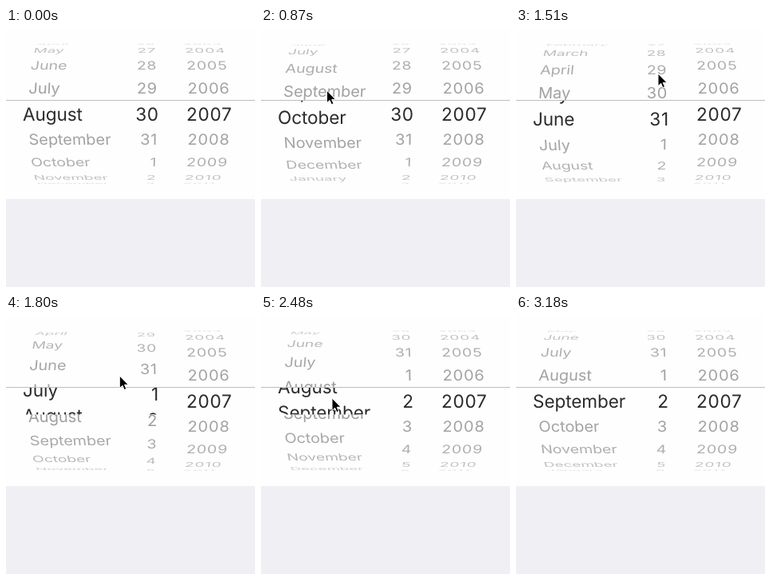
Animation of 312x324 px, one loop 4760 ms. Source, as an HTML page:

```html
<!DOCTYPE html>
<html lang="en">
<head>
<meta charset="utf-8">
<title>Date picker</title>
<style>
html, body { margin: 0; width: 100%; height: 100%; overflow: hidden; background: #efeff4; }
svg { display: block; width: 100%; height: 100%; }
text { font-family: Inter, Roboto, sans-serif; text-rendering: geometricPrecision; }
.wheel { font-size: 20.2px; fill: #999; }
.picked { font-size: 22.6px; fill: #2b2b2d; }
</style>
</head>
<body>
<svg viewBox="0 0 312 324">
  <defs>
    <clipPath id="outside"><path d="M0 19H312V90H0ZM0 124.5H312V195H0Z"/></clipPath>
    <clipPath id="band"><path d="M0 90H312V124.5H0Z"/></clipPath>
  </defs>
  <rect width="312" height="324" fill="#efeff4"/>
  <rect width="312" height="214" fill="#fefefe"/>
  <g id="wheel" class="wheel" clip-path="url(#outside)"></g>
  <g id="picked" class="picked" clip-path="url(#band)"></g>
  <rect y="90" width="312" height="1" fill="#bebec0"/>
  <path id="cursor" d="M0 0V15.6L3.6 12.3 5.9 17.6 8.5 16.5 6.2 11.3H11Z"
        fill="#000" stroke="#fff" stroke-width="1" stroke-linejoin="round"/>
</svg>
<script>
const LOOP = 4760;
const CX = 156, CY = 107.5, RADIUS = 87, STEP = 0.3822, DEPTH = 0.1, ROW = 32;
const MONTHS = ['January', 'February', 'March', 'April', 'May', 'June', 'July',
  'August', 'September', 'October', 'November', 'December'];

const wrap = (n, size) => ((n % size) + size) % size;
const phase = (t, from, to) => Math.min(1, Math.max(0, (t - from) / (to - from)));
const smooth = u => u * u * (3 - 2 * u);
const coast = u => 1 - (1 - u) ** 3.06;

// Each column: row position over time, row label and text layout.
const columns = [
  {
    // A flick coasts to rest between two rows, then snaps to the next one.
    pos: t => 7 + 12.545 * coast(phase(t, 773, 2660)) + 0.455 * smooth(phase(t, 2600, 2960)),
    label: n => MONTHS[wrap(n, 12)],
    anchor: 'start', x: 27.5, pickedX: 21, gap: -0.1, pickedGap: -0.1
  },
  {
    pos: t => 30 + 3 * smooth(phase(t, 1220, 2080)),
    label: n => wrap(n - 1, 31) + 1,
    anchor: 'end', x: 190, pickedX: 191.7, gap: 0.6, pickedGap: 0.6
  },
  {
    pos: () => 2007,
    label: n => n,
    anchor: 'start', x: 228, pickedX: 226, gap: 0.8, pickedGap: 0.7
  }
];

// Stops of the pointer: time, x, y.
const stops = [[430, 322, 166], [590, 155, 141], [860, 82, 78], [1100, 176, 97],
  [1510, 178, 57], [2140, 97, 100], [2480, 89, 104], [3120, 322, 236]];

const byId = id => document.getElementById(id);
const cursor = byId('cursor');

function makeTexts(parent, count, anchor, gap) {
  return Array.from({ length: count }, () => {
    const el = document.createElementNS('http://www.w3.org/2000/svg', 'text');
    el.setAttribute('text-anchor', anchor);
    el.setAttribute('letter-spacing', gap);
    return parent.appendChild(el);
  });
}

for (const c of columns) {
  c.rows = makeTexts(byId('wheel'), 10, c.anchor, c.gap);
  c.front = makeTexts(byId('picked'), 4, c.anchor, c.pickedGap);
}

function place(el, label, matrix, baseline) {
  el.textContent = label;
  el.setAttribute('y', baseline);
  el.setAttribute('transform', `matrix(${matrix.map(v => v.toFixed(4))})`);
}

function drawColumn(c, t) {
  const pos = c.pos(t), base = Math.floor(pos);
  c.rows.forEach((el, i) => {
    const n = base - 4 + i, angle = (n - pos) * STEP;
    const hidden = Math.abs(angle) > Math.PI / 2;
    el.style.display = hidden ? 'none' : '';
    if (hidden) return;
    const cos = Math.cos(angle), sin = Math.sin(angle);
    const scale = 1 / (1 + DEPTH * (1 - cos));
    const lean = -(c.x - CX) * DEPTH * sin * scale * scale / RADIUS;
    place(el, c.label(n), [scale, 0, lean, Math.max(cos, 0.1),
      CX + (c.x - CX) * scale, CY + RADIUS * sin], 7);
    el.setAttribute('opacity', (0.35 + 0.6 * cos).toFixed(3));
  });
  c.front.forEach((el, i) => {
    const n = base - 1 + i;
    place(el, c.label(n), [1, 0, 0, 1, c.pickedX, CY + (n - pos) * ROW], 8);
  });
}

function drawCursor(t) {
  const next = Math.max(1, stops.findIndex(s => s[0] > t));
  const i = t >= stops.at(-1)[0] ? stops.length - 1 : next;
  const [t0, x0, y0] = stops[i - 1], [t1, x1, y1] = stops[i];
  const u = smooth(phase(t, t0, t1));
  cursor.setAttribute('transform', `translate(${x0 + (x1 - x0) * u} ${y0 + (y1 - y0) * u})`);
}

function draw(t) {
  columns.forEach(c => drawColumn(c, t));
  drawCursor(t);
}

let start;
function tick(now) {
  start ??= now;
  draw((now - start) % LOOP);
  requestAnimationFrame(tick);
}
draw(0);
requestAnimationFrame(tick);
</script>
</body>
</html>
```
